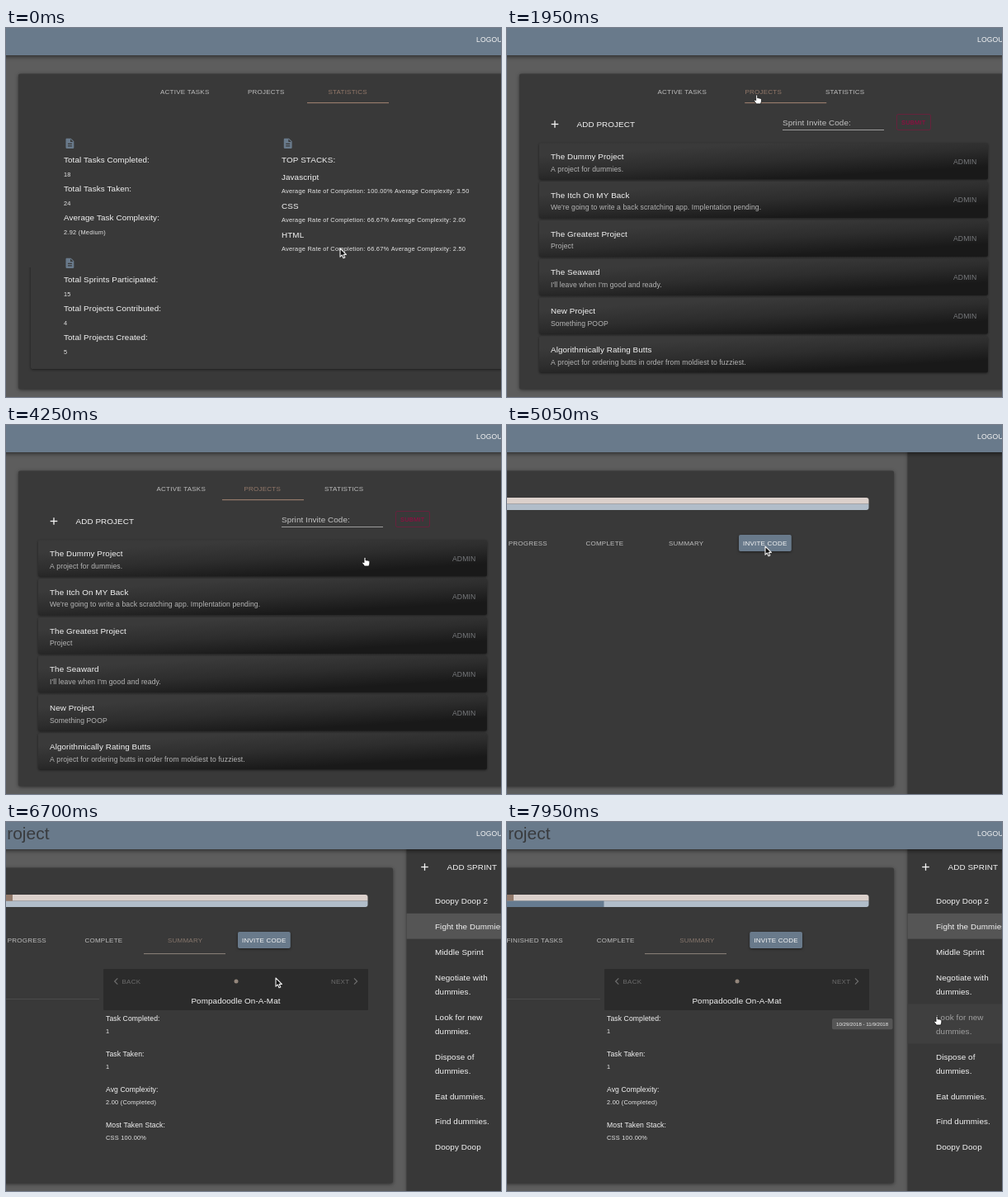
An HTML page with a canvas that plays this animation: 600x447 px, repeating every 8000 ms.

```html
<!DOCTYPE html>
<html lang="en">
<head>
<meta charset="utf-8">
<title>Task board</title>
<style>
html, body { margin: 0; width: 100%; height: 100%; overflow: hidden; background: #5c5c5c; }
canvas { display: block; width: 600px; height: 447px; }
</style>
</head>
<body>
<canvas id="stage"></canvas>
<script>
const W = 600, H = 447, LOOP = 8000;
const canvas = document.getElementById('stage');
const ctx = canvas.getContext('2d');
const dpr = window.devicePixelRatio || 1;
canvas.width = W * dpr;
canvas.height = H * dpr;

const SLATE = '#697a8b', PAPER = '#393939', PAGE = '#5d5d5d', BROWN = '#94796a';
const LIGHT = '#f4f4f4', SOFT = '#bdbdbd', DIM = '#6c6c6c';
// Type sizes and their letter spacing
const TITLE = 20.98, SUB = 9.87, BODY = 8.64, TAB = 8.02, CAP = 7.4, TIP = 6.17;
const SPACING = { [SUB]: 0.09, [BODY]: 0.09, [TAB]: 0.22, [CAP]: 0.25 };

// Moments of change, in ms
const OPEN_PROJECTS = 1750, OPEN_BOARD = 4300, LOADED = 5250, PICK = 5700,
      OPEN_SUMMARY = 6250, SWITCH = 7850;

const DOC = new Path2D('M14 2H6c-1.1 0-2 .9-2 2v16c0 1.1.9 2 2 2h12a2 2 0 0 0 2-2V8l-6-6z' +
  'M16 18H8v-2h8zM16 14H8v-2h8zM13 9V3.5L18.5 9z');
const ARROW = new Path2D('M0 0V10.2L2.4 8L4 11.8L5.8 11L4.2 7.4H7.4Z');
const HAND = new Path2D('M-1 .8Q0-.6 1 .8V4Q2 3.2 2.8 4.2Q3.8 3.6 4.4 4.6Q5.6 4.2 5.8 5.6' +
  'V8L4.8 11H-.4L-3.2 7.2Q-3.2 5.6-1.8 6.2L-1 7Z');

const projects = [
  ['The Dummy Project', 'A project for dummies.'],
  ['The Itch On MY Back', "We're going to write a back scratching app. Implentation pending."],
  ['The Greatest Project', 'Project'],
  ['The Seaward', "I'll leave when I'm good and ready."],
  ['New Project', 'Something POOP'],
  ['Algorithmically Rating Butts', 'A project for ordering butts in order from moldiest to fuzziest.']
];

let rowTop = 80;
const sprints = [
  ['Doopy Doop 2'], ['Fight the Dummies'], ['Middle Sprint'], ['Negotiate with', 'dummies.'],
  ['Look for new', 'dummies.'], ['Dispose of', 'dummies.'], ['Eat dummies.'],
  ['Find dummies.'], ['Doopy Doop']
].map(lines => {
  const row = { lines, y: rowTop, h: lines.length > 1 ? 48 : 30.8 };
  rowTop += row.h;
  return row;
});

// Pointer: time, x, y, hand shape from this moment on
const path = [
  [0, 405, 267, 0], [250, 499, 215, 0], [550, 310, 190, 0], [850, 90, 292, 0],
  [1000, 84, 322, 0], [1200, 180, 220, 0], [1400, 303, 75, 1], [1900, 303, 75, 1],
  [2150, 300, 130, 1], [2700, 280, 385, 1], [3050, 262, 160, 1], [3400, 330, 172, 1],
  [3500, 330, 172, 1], [3900, 470, 164, 1], [4200, 435, 160, 1], [4300, 435, 160, 0],
  [4400, 435, 160, 0], [4500, 455, 172, 0], [4750, 313, 147, 0], [5150, 313, 147, 0],
  [5550, 555, 122, 1], [5750, 560, 122, 1], [5850, 500, 128, 0], [6150, 217, 141, 1],
  [6350, 217, 141, 0], [6700, 327, 189, 0], [6950, 530, 230, 1], [7200, 545, 358, 1],
  [7450, 540, 290, 1], [7700, 521, 235, 1], [8000, 521, 235, 1]
];

const clamp = v => Math.max(0, Math.min(1, v));
const ease = v => { v = clamp(v); return v * v * (3 - 2 * v); };
const mix = (a, b, v) => a + (b - a) * v;

function pointerAt(t) {
  let i = 0;
  while (i < path.length - 2 && t >= path[i + 1][0]) i++;
  const [t0, x0, y0, hand] = path[i], [t1, x1, y1] = path[i + 1];
  const v = ease((t - t0) / (t1 - t0));
  return { x: mix(x0, x1, v), y: mix(y0, y1, v), hand };
}

// y is the middle of the capitals
function text(str, x, y, size, color = LIGHT, align = 'left') {
  ctx.font = `${size}px "Liberation Sans", Arial, sans-serif`;
  ctx.letterSpacing = (SPACING[size] || 0) + 'px';
  ctx.textAlign = align;
  ctx.fillStyle = color;
  ctx.fillText(str, x, y + size * 0.36);
}

function rect(x, y, w, h, color) {
  ctx.fillStyle = color;
  ctx.fillRect(x, y, w, h);
}

function box(x, y, w, h, r, color, blur = 0, drop = 0) {
  ctx.save();
  if (blur) {
    ctx.shadowColor = 'rgba(0,0,0,.5)';
    ctx.shadowBlur = blur * dpr;
    ctx.shadowOffsetY = drop * dpr;
  }
  ctx.fillStyle = color;
  ctx.beginPath();
  ctx.roundRect(x, y, w, h, r);
  ctx.fill();
  ctx.restore();
}

function line(points, color, width) {
  ctx.strokeStyle = color;
  ctx.lineWidth = width;
  ctx.beginPath();
  points.forEach(([x, y]) => ctx.lineTo(x, y));
  ctx.stroke();
}

function plus(x, y) {
  line([[x - 4.3, y], [x + 4.3, y]], LIGHT, 1.3);
  line([[x, y - 4.3], [x, y + 4.3]], LIGHT, 1.3);
}

function docIcon(x, y) {
  ctx.save();
  ctx.translate(x, y);
  ctx.scale(0.617, 0.617);
  ctx.fillStyle = SLATE;
  ctx.fill(DOC, 'evenodd');
  ctx.restore();
}

function header(title) {
  box(-10, -10, W + 20, 43, 0, SLATE, 5, 2);
  if (title) text('Project', 52.5, 13.8, TITLE, '#393b3e', 'right');
  text('LOGOUT', 570, 14, BODY);
}

function homeTabs(active, shift, barX) {
  [['ACTIVE TASKS', 187], ['PROJECTS', 293], ['STATISTICS', 390.5]].forEach(([name, x], i) =>
    text(name, x + shift, 77, TAB, i === active ? BROWN : SOFT));
  rect(barX, 90, 99, 1.2, BROWN);
}

function facts(x, y, step, gap, pairs) {
  pairs.forEach(([name, value], i) => {
    text(name, x, y + i * step, SUB);
    text(value, x, y + i * step + gap, CAP, '#e6e6e6');
  });
}

function statistics() {
  box(30, 100, W, 313, 2, PAPER, 3, 1);
  rect(20, 95, W, 195, PAPER);
  homeTabs(2, 0, 365);
  docIcon(70, 132.4);
  facts(70, 159.5, 35, 17.7, [['Total Tasks Completed:', '18'], ['Total Tasks Taken:', '24'],
    ['Average Task Complexity:', '2.92 (Medium)']]);
  docIcon(70, 277.4);
  facts(70, 304.5, 35, 17.7, [['Total Sprints Participated:', '15'],
    ['Total Projects Contributed:', '4'], ['Total Projects Created:', '5']]);
  docIcon(334.3, 132.4);
  text('TOP STACKS:', 334, 159.5, SUB);
  const rate = (done, level) => `Average Rate of Completion: ${done}% Average Complexity: ${level}`;
  facts(334, 180.5, 35, 17.2, [['Javascript', rate('100.00', '3.50')],
    ['CSS', rate('66.67', '2.00')], ['HTML', rate('66.67', '2.50')]]);
}

function projectList(t) {
  homeTabs(1, -4.5, mix(365, 262, ease((t - OPEN_PROJECTS) / 300)));
  plus(58, 116.5);
  text('ADD PROJECT', 84.5, 116.5, SUB);
  text('Sprint Invite Code:', 334, 114, SUB, '#c4c4c4');
  rect(334, 123, 123, 0.9, '#a8a8a8');
  ctx.strokeStyle = 'rgba(170,0,65,.5)';
  ctx.lineWidth = 0.8;
  ctx.beginPath();
  ctx.roundRect(472.5, 104.5, 41, 19, 2);
  ctx.stroke();
  text('SUBMIT', 478, 114, CAP, '#a90044');
  projects.forEach(([name, note], i) => {
    const y = 139.3 + i * 46.8;
    const shade = ctx.createLinearGradient(311, y, 313.5, y + 44);
    shade.addColorStop(0, '#3a3a3a');
    shade.addColorStop(0.5, '#2d2d2d');
    shade.addColorStop(1, '#191919');
    box(39, y, 544, 44, 2, shade, 3, 1);
    text(name, 53, y + 16.2, SUB);
    text(note, 53, y + 31.2, BODY, '#b5b5b5');
    if (i < 5) text('ADMIN', 541, y + 22.2, BODY, '#77797c');
  });
}

function progressBar(t) {
  ctx.save();
  ctx.beginPath();
  ctx.roundRect(-10, 88, 448.5, 15, 3);
  ctx.clip();
  rect(0, 88, 440, 7.6, '#dbd0cb');
  rect(0, 95.6, 440, 7.4, '#b1bdc9');
  rect(0, 88, 8 * ease((t - PICK) / 300), 7.6, '#92796a');
  if (t >= SWITCH) rect(0, 95.6, 117.5, 7.4, '#667b90');
  ctx.restore();
}

function summary() {
  rect(167, 159, 99, 1.1, '#857c75');
  rect(0, 214, 113, 0.9, '#4d4d4d');
  box(118, 178, 321, 50, 1, '#2b2b2b');
  line([[135.3, 189.4], [131.7, 193], [135.3, 196.6]], DIM, 1.3);
  text('BACK', 140.5, 193.3, TAB, DIM);
  text('NEXT', 394, 193.3, TAB, DIM);
  line([[422, 189.4], [425.6, 193], [422, 196.6]], DIM, 1.3);
  ctx.fillStyle = '#94877c';
  ctx.beginPath();
  ctx.arc(279, 193, 2.5, 0, Math.PI * 2);
  ctx.fill();
  text('Pompadoodle On-A-Mat', 278.5, 216, SUB, LIGHT, 'center');
  [['Task Completed:', '1'], ['Task Taken:', '1'], ['Avg Complexity:', '2.00 (Completed)'],
    ['Most Taken Stack:', 'CSS 100.00%']].forEach(([name, value], i) => {
    const y = 238 + i * 43.1;
    text(name, 121, y, BODY);
    text(value, 121, y + 15, CAP, '#e6e6e6');
  });
}

function sidebar(t, pointer) {
  box(485.5, 30, 130, H, 0, '#383838', 4, 0);
  if (t < LOADED) return;
  plus(507.5, 54.5);
  text('ADD SPRINT', 534.5, 54, SUB);
  sprints.forEach(({ lines, y, h }, i) => {
    const over = pointer.hand && pointer.x > 486 && pointer.y >= y && pointer.y < y + h;
    const picked = i === 1 && t >= PICK;
    if (picked) rect(485.5, y, 115, h, '#555');
    else if (over) rect(485.5, y, 115, h, '#3f3f3f');
    lines.forEach((str, n) =>
      text(str, 520, y + 15.6 + n * 17.2, SUB, over && !picked ? '#a0a0a0' : LIGHT));
  });
}

function board(t, pointer) {
  box(-10, 55.5, 479, 382, 2, PAPER, 4, 1);
  progressBar(t);
  const late = t >= SWITCH, shift = late ? 13.2 : 0, open = t >= OPEN_SUMMARY;
  if (late) text('FINISHED TASKS', -0.5, 143, TAB, SOFT);
  else text('PROGRESS', 1.7, 143, TAB, SOFT);
  text('COMPLETE', 95.5 + shift, 143, TAB, SOFT);
  text('SUMMARY', 196 + shift, 143, TAB, open ? '#86766c' : SOFT);
  box(281 + shift, 133, 63.8, 20, 2, SLATE, 3, 1);
  text('INVITE CODE', 286 + shift, 143, TAB);
  if (open) summary();
  sidebar(t, pointer);
  if (t >= 7750) {
    box(394, 238, 73.5, 13.3, 2, '#555');
    text('10/29/2018 - 11/9/2018', 399, 244.8, TIP, '#eee');
  }
}

function drawPointer({ x, y, hand }) {
  ctx.save();
  ctx.translate(x, y);
  ctx.lineJoin = 'round';
  ctx.lineWidth = hand ? 0.8 : 1.1;
  ctx.fillStyle = hand ? '#fff' : '#111';
  ctx.strokeStyle = hand ? '#111' : '#eee';
  const shape = hand ? HAND : ARROW;
  ctx.fill(shape);
  ctx.stroke(shape);
  ctx.restore();
}

function draw() {
  const t = performance.now() % LOOP;
  const pointer = pointerAt(t);
  ctx.setTransform(dpr, 0, 0, dpr, 0, 0);
  rect(0, 0, W, H, PAGE);
  if (t >= OPEN_BOARD) {
    board(t, pointer);
  } else {
    box(15, 55.5, W, 382, 2, PAPER, 4, 1);
    if (t < OPEN_PROJECTS) statistics();
    else projectList(t);
  }
  header(t >= LOADED);
  drawPointer(pointer);
  requestAnimationFrame(draw);
}
draw();
</script>
</body>
</html>
```
